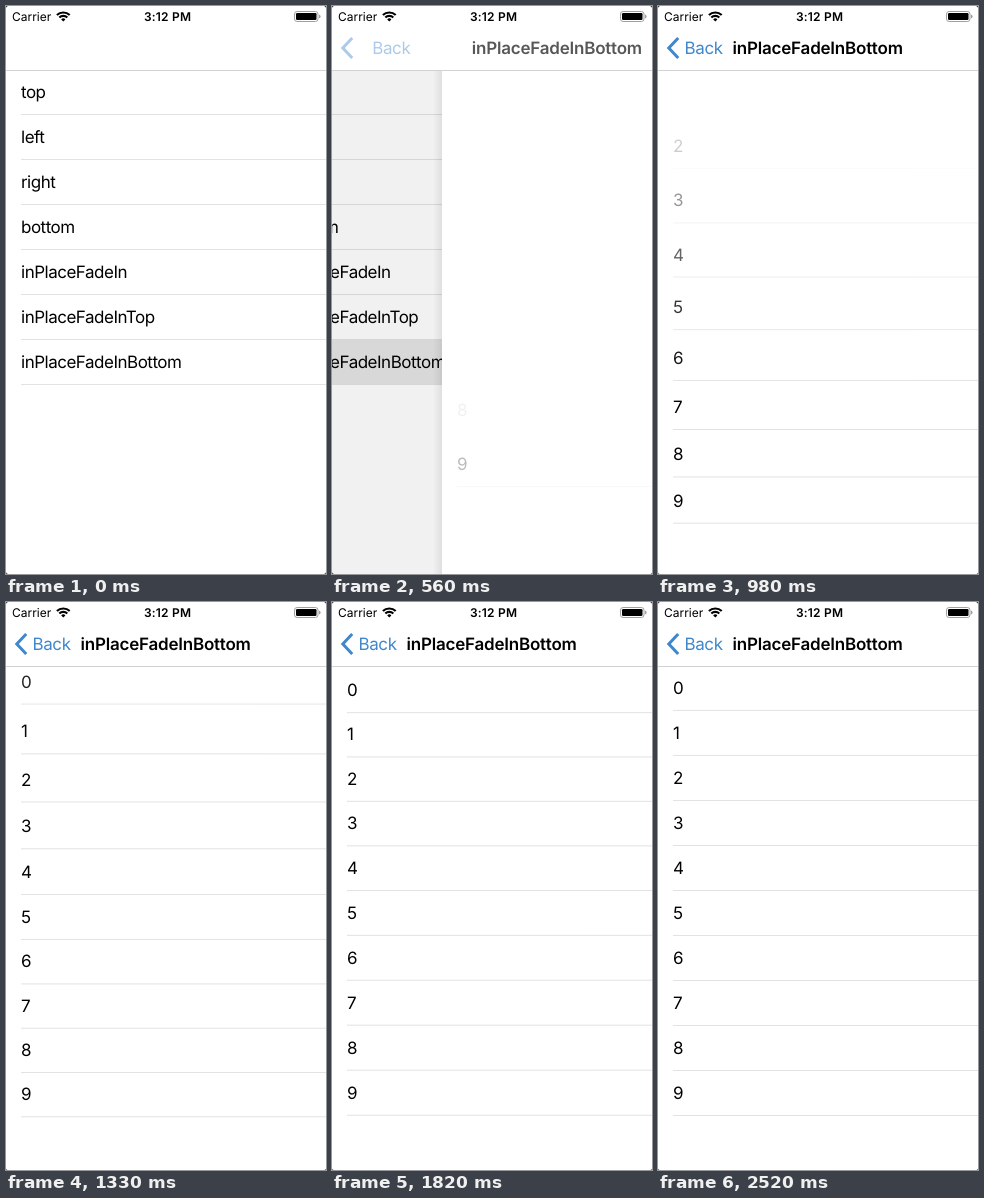
An HTML page for the animation above (2590 ms loop, 320x568 px).

```html
<!DOCTYPE html>
<html lang="en">
<head>
<meta charset="utf-8">
<title>List transition</title>
<style>
  html, body { margin: 0; width: 100%; height: 100%; overflow: hidden; background: #222; }
  svg { display: block; width: 320px; height: 568px; background: #fff; border-radius: 2.5px; }
  text {
    font: 17px Inter, "Liberation Sans", sans-serif;
    letter-spacing: -0.49px;
    text-rendering: geometricPrecision;
    fill: #000;
  }
  .bold { font-weight: 600; }
  .heading { letter-spacing: -0.21px; }
  .status { font-size: 12px; letter-spacing: 0; }
  .clock { letter-spacing: 0.2px; text-anchor: middle; }
  .line { fill: #e2e2e3; }
  .tint { fill: #4088cd; letter-spacing: -0.4px; }
  .chevron { fill: none; stroke: #4088cd; stroke-width: 3; }
</style>
</head>
<body>
<svg viewBox="0 0 320 568">
  <defs>
    <linearGradient id="edge">
      <stop offset="0" stop-opacity="0"/>
      <stop offset="1" stop-opacity="0.22"/>
    </linearGradient>
    <clipPath id="body"><rect y="65" width="320" height="503"/></clipPath>
  </defs>

  <g clip-path="url(#body)">
    <g id="menu">
      <rect id="highlight" y="333" width="320" height="46" fill="#dedede"/>
    </g>
    <rect id="dim" width="320" height="568"/>
    <g id="page">
      <rect id="shadow" x="-9" width="9" height="568" fill="url(#edge)"/>
      <rect width="320" height="568" fill="#fff"/>
    </g>
  </g>

  <rect class="line" y="64" width="320" height="1" style="fill:#d2d2d3"/>
  <g id="back">
    <path class="chevron" d="M20.2 32 10.8 42l9.4 10"/>
    <text id="backLabel" class="tint" x="26.5" y="48">Back</text>
  </g>
  <text id="title" class="bold heading" x="74.5" y="48">inPlaceFadeInBottom</text>

  <text class="status" x="6" y="14.5">Carrier</text>
  <g fill="none" stroke="#000" stroke-width="2.1">
    <path d="M50.9 9.1a9 9 0 0 1 12.8 0"/>
    <path d="M53.3 11.5a5.7 5.7 0 0 1 8 0"/>
    <path d="M57.3 15.5l-2.1-2.1a3 3 0 0 1 4.2 0z" fill="#000" stroke="none"/>
  </g>
  <text class="status clock bold" x="161.6" y="14.5">3:12 PM</text>
  <rect x="288.5" y="5.5" width="23.5" height="10" rx="2.6" fill="none" stroke="#a0a0a0"/>
  <rect x="290" y="7" width="20.5" height="7" rx="1.2"/>
  <path d="M313 8.5q1.6 .6 1.6 2t-1.6 2z" fill="#a0a0a0"/>
</svg>

<script>
const LOOP = 2590, STEP = 70;
const TAP = 420, PUSH = 437;
const FIRST_CELL = 478, CELL_DELAY = 63, ROW = 45;
const labels = ["top", "left", "right", "bottom",
  "inPlaceFadeIn", "inPlaceFadeInTop", "inPlaceFadeInBottom"];

const $ = id => document.getElementById(id);

function add(parent, tag, attrs, text = "") {
  const el = document.createElementNS("http://www.w3.org/2000/svg", tag);
  for (const key in attrs) el.setAttribute(key, attrs[key]);
  el.textContent = text;
  return parent.appendChild(el);
}

function addRow(parent, label, i) {
  const row = add(parent, "g", {});
  add(row, "text", { x: 15, y: 92 + ROW * i }, label);
  add(row, "rect", { class: "line", x: 15, y: 108 + ROW * i, width: 305, height: 1 });
  return row;
}

labels.forEach((label, i) => addRow($("menu"), label, i));
const cells = Array.from({ length: 10 }, (_, i) => addRow($("page"), i, i));

const shift = (el, x, y = 0) => el.setAttribute("transform", `translate(${x} ${y})`);
const fade = (el, a) => el.setAttribute("opacity", Math.min(1, Math.max(0, a)));

// Critically damped push, 0 to 1
function push(ms) {
  const k = Math.max(0, ms) / 1000 * 18.26;
  return 1 - (1 + k) * Math.exp(-k);
}

// Underdamped spring with a starting velocity: distance left, 1 to 0
function spring(ms) {
  const s = Math.max(0, ms) / 1000;
  const w = 4.76 * s;
  return Math.exp(-3.89 * s) * (Math.cos(w) + 0.225 * Math.sin(w));
}

function draw(t) {
  const p = push(t - PUSH), rest = 1 - p;
  const tapped = t >= TAP;

  fade($("highlight"), tapped ? 1 - 0.35 * p : 0);
  shift($("menu"), -95 * p);
  fade($("dim"), 0.083 * p);

  fade($("page"), tapped ? 1 : 0);
  shift($("page"), Math.round(320 * rest));
  fade($("shadow"), rest);

  fade($("back"), p ** 2);
  shift($("backLabel"), 40 * rest);
  fade($("title"), p);
  shift($("title"), 190 * rest);

  cells.forEach((cell, i) => {
    const left = spring(t - FIRST_CELL - (9 - i) * CELL_DELAY);
    shift(cell, 0, -ROW * left);
    fade(cell, 1 - left);
  });
}

const start = performance.now();
function tick() {
  const t = (performance.now() - start) % LOOP;
  draw(Math.floor(t / STEP) * STEP);
  requestAnimationFrame(tick);
}
tick();
</script>
</body>
</html>
```
